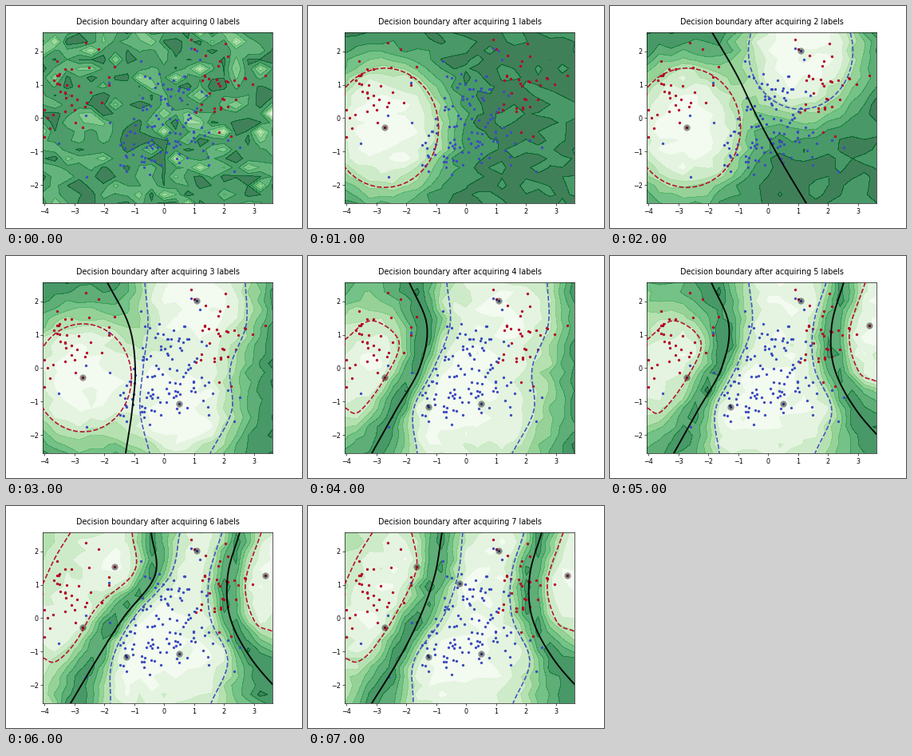
Recreate the animation shown at these times as a matplotlib script. Size 371x278 px, loop 8 s.

```python
import numpy as np
import matplotlib.pyplot as plt
from matplotlib.animation import FuncAnimation

W, H, DPI = 371, 278, 58
RED, BLUE = "#b40426", "#3b4cc0"
XLIM, YLIM = (-4.043, 3.61), (-2.56, 2.565)
RIDGE, MARGIN, CORE = .85, .3, .1  # uncertainty on black lines, dashes, labels


def to_data(points):
    """Stage pixels to axis units."""
    p = np.asarray(points, float)
    return np.column_stack([(p[:, 0] - 198.3) / 37.57, (140.5 - p[:, 1]) / 41.75])


def dist(a, b):
    return np.hypot(*(a[:, None] - b[None]).transpose(2, 0, 1))


def smooth(*keys):
    """Catmull-Rom curve through key pixels."""
    k = to_data(keys)
    k = np.vstack([2 * k[0] - k[1], k, 2 * k[-1] - k[-2]])
    t = np.linspace(0, 1, 8, endpoint=False)[:, None]
    parts = [b + t * ((c - a) + t * ((2 * a - 5 * b + 4 * c - d)
                                     + t * (3 * b - a - 3 * c + d))) / 2
             for a, b, c, d in zip(k, k[1:], k[2:], k[3:])]
    return np.vstack(parts + [k[-2:-1]])


def down(*xs):
    """Curve from top to bottom, given x at evenly spaced heights."""
    return smooth(*zip(xs, np.linspace(33, 247, len(xs))))


def ring(center, radius):
    a = np.linspace(0, 2 * np.pi, 45)
    return center + radius * np.column_stack([np.cos(a), np.sin(a)])


# Acquired labels in order, then the pool around them
PICKS = to_data([(96.5, 152.5), (239, 56.5), (217, 185), (151, 189),
                 (325, 87), (136, 76), (190, 97)])
rng = np.random.default_rng(4)


def cloud(center, spread, count):
    return to_data(rng.normal(center, spread, (count, 2)))


REDS = np.vstack([PICKS[[0, 4, 5]], cloud((82, 103), (23, 27), 38),
                  cloud((266, 95), (20, 28), 36)])
BLUES = np.vstack([PICKS[[1, 2, 3, 6]], cloud((203, 107), (25, 25), 40),
                   cloud((186, 173), (38, 24), 78)])


def boundaries(n):
    """Black, red and blue curves after n labels."""
    black, red, blue = [], [], []
    if 1 <= n <= 3:
        red = [ring(PICKS[0], 1.79 if n < 3 else 1.62)]
    if n == 2:
        black, blue = [down(128, 159, 185, 214, 246)], [ring(PICKS[1], 1.745)]
    elif n == 3:
        black, blue = [down(127, 154, 162, 158, 150)], [down(174, 178, 172, 168, 180)]
    elif n in (4, 5):
        black, blue = [down(127, 149, 140, 110, 80)], [down(174, 178, 158, 132, 137)]
        red = [smooth((46, 105), (80, 81), (114, 107), (97, 152), (64, 195), (46, 190))]
    elif n == 6:
        black, blue = [down(182, 187, 147, 113, 81)], [down(218, 206, 160, 133, 131)]
        red = [smooth((158, 33), (161, 82), (115, 125), (86, 172), (62, 195), (46, 190))]
    elif n == 7:
        black, blue = [down(168, 159, 140, 113, 80)], [down(194, 188, 169, 133, 132)]
        red = [smooth((130, 33), (136, 78), (113, 130), (83, 177), (62, 195), (46, 190))]
    if n in (3, 4):
        blue.append(down(300, 301, 281, 283, 256))
    if n >= 5:
        black.append(down(293, 278, 281, 309, 356))
        red.append(smooth((320, 33), (300, 97), (312, 145), (334, 157)))
        blue.append(down(271, 255, 256, 278, 257))
    if n >= 6:
        red.append(smooth((81, 33), (62, 64), (46, 98)))
    return black, red, blue


GX, GY = np.meshgrid(np.linspace(*XLIM, 20), np.linspace(*YLIM, 20))
GRID = np.column_stack([GX.ravel(), GY.ravel()])


def single_blobs(n):
    """Sure close to each label, unsure elsewhere."""
    r = dist(GRID, PICKS[:n])
    return .84 * np.prod(1 - np.exp(-(r / 2.15) ** 3.5), axis=1) + .06


def between_curves(n):
    """Surface through the known values on curves, labels and open corners."""
    black, red, blue = boundaries(n)
    left, right = (.68 if n < 6 else .38), (.8 if n < 5 else .15)
    parts = [(c, RIDGE) for c in black] + [(c, MARGIN) for c in red + blue]
    parts += [(PICKS[:n], CORE),
              (to_data([(215, 125), (195, 225), (62, 140)]), .13),
              (to_data([(50, 36), (48, 243)]), left),
              (to_data([(328, 45), (328, 120)]), right),
              (to_data([(330, 190), (312, 243)]), .77)]
    pos = np.vstack([p for p, _ in parts])
    val = np.concatenate([np.full(len(p), v) for p, v in parts])
    kernel = .02 * np.eye(len(pos)) - dist(pos, pos)
    weights = np.linalg.solve(kernel, val - val.mean())
    return val.mean() - dist(GRID, pos) @ weights


def uncertainty(n):
    noise = np.random.default_rng(20 + n)
    if n == 0:
        u = .98 - noise.gamma(2, .11, len(GRID))
    else:
        u = single_blobs(n) if n < 4 else between_curves(n)
        u = u + noise.normal(0, .04, len(GRID))
    return np.clip(u, .01, .99).reshape(GX.shape)


fig, ax = plt.subplots(figsize=(W / DPI, H / DPI), dpi=DPI)


def draw(n):
    ax.clear()
    u = uncertainty(n)
    levels = np.linspace(0, 1, 9 if n == 0 else 10)
    ax.contourf(GX, GY, u, levels, cmap="Greens", alpha=.75)
    ax.contour(GX, GY, u, levels, cmap="Greens", linewidths=.6)
    for pts, color in ((REDS, RED), (BLUES, BLUE)):
        ax.scatter(*pts.T, s=17, color=color, linewidths=0, zorder=3)
    ax.scatter(*PICKS[:n].T, s=105, color="black", alpha=.42, linewidths=0, zorder=4)

    styles = ("black", "-", 2.4), (RED, "--", 2), (BLUE, "--", 2)
    for curves, (color, dash, width) in zip(boundaries(n), styles):
        for c in curves:
            ax.plot(*c.T, color=color, ls=dash, lw=width, alpha=.95, zorder=5)

    ax.set_xlim(*XLIM)
    ax.set_ylim(*YLIM)
    ax.set_xticks(range(-4, 4))
    ax.set_yticks(range(-2, 3))
    ax.text(.5, 1.05, f"Decision boundary after acquiring {n} labels",
            transform=ax.transAxes, ha="center", fontsize=12)
    return []


anim = FuncAnimation(fig, draw, frames=8, init_func=lambda: [], interval=1000,
                     repeat=True, repeat_delay=0)
plt.show()
```
